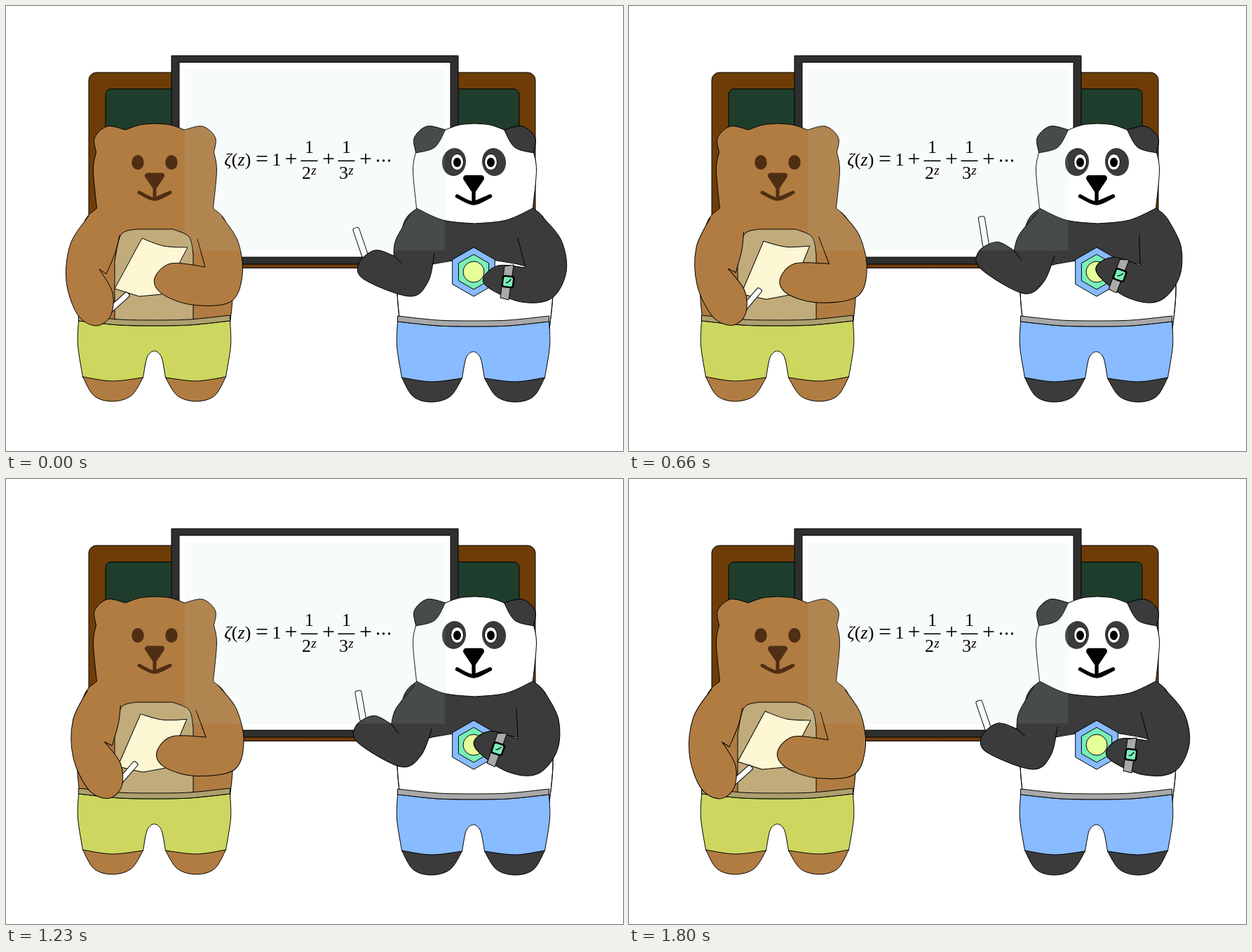
An HTML page with a canvas for the animation above (1830 ms loop, 880 by 636 pixels).

```html
<!DOCTYPE html>
<html lang="en">
<head>
<meta charset="utf-8">
<title>Zeta lecture</title>
<style>
html, body { margin: 0; width: 100%; height: 100%; overflow: hidden; background: #fff; }
canvas { display: block; width: 880px; height: 636px; }
</style>
</head>
<body>
<canvas id="stage"></canvas>
<script>
const W = 880, H = 636, LOOP = 1830, STEP = 30;
const FUR = '#b17c42', FACE = '#4f2e13', DARK = '#3b3b3b', BLUE = '#88bbff', TEAL = '#79efb9', GREY = '#a9a9a9';
const canvas = document.getElementById('stage');
const ctx = canvas.getContext('2d');
const dpr = window.devicePixelRatio || 1;
canvas.width = W * dpr;
canvas.height = H * dpr;

// Key points as text; "|" marks a corner between smooth parts.
const parse = text => text.split('|').map(part =>
  part.trim().split(/\s+/).map(s => s.split(',').map(Number)));

function trace(parts, close) {
  const path = new Path2D();
  parts.forEach((q, k) => {
    if (k) path.lineTo(...q[0]); else path.moveTo(...q[0]);
    for (let i = 0; i < q.length - 1; i++) {
      const b = q[i], c = q[i + 1], a = q[i - 1] || b, d = q[i + 2] || c;
      path.bezierCurveTo(b[0] + (c[0] - a[0]) / 6, b[1] + (c[1] - a[1]) / 6,
        c[0] - (d[0] - b[0]) / 6, c[1] - (d[1] - b[1]) / 6, c[0], c[1]);
    }
  });
  if (close) path.closePath();
  return path;
}
const curve = text => trace(parse(text), false);
const shape = text => trace(parse(text), true);
const flip = parts => parts.map(q => q.map(([x, y]) => [-x, y]));
// Closes a left half with its mirror image about x = 0.
function whole(text) {
  const half = parse(text);
  const back = flip(half).reverse().map(q => q.reverse());
  return trace([...half, ...back], true);
}
const pair = text => [trace(parse(text), true), trace(flip(parse(text)), true)];

function hexagon(x, y, r) {
  const p = new Path2D();
  for (let i = 0; i < 6; i++) p.lineTo(x + r * Math.sin(i * Math.PI / 3), y - r * Math.cos(i * Math.PI / 3));
  p.closePath();
  return p;
}

function paint(path, fill, line = '#000', width = 1) {
  if (fill) { ctx.fillStyle = fill; ctx.fill(path); }
  if (line) { ctx.strokeStyle = line; ctx.lineWidth = width; ctx.stroke(path); }
}
function box(x, y, w, h, r, fill, line) {
  const p = new Path2D();
  p.roundRect(x, y, w, h, r);
  paint(p, fill, line);
}
function oval(x, y, rx, ry, fill, line = null, turn = 0) {
  const p = new Path2D();
  p.ellipse(x, y, rx, ry, turn, 0, Math.PI * 2);
  paint(p, fill, line);
}
function at(x, y, deg, draw) {
  ctx.save();
  ctx.translate(x, y);
  ctx.rotate(deg * Math.PI / 180);
  draw();
  ctx.restore();
}
const swing = (x, y, deg, draw) => at(x, y, deg, () => { ctx.translate(-x, -y); draw(); });
const stick = (x, y, deg, w, len) => at(x, y, deg, () => box(-w / 2, 0, w, len, 2.5, '#fff'));

// Parts shared by both animals, around their own axis.
const EAR = '-42,177 -68,172 -86,188 -84,209';
const HEAD = `0,168 -22,170 -42,177 | ${EAR} | -84,209 -88,235 -83,289`;
const BODY = '-83,289 -103,315 -111,400 -106,462';
const part = {
  figure: whole(`${HEAD} | ${BODY}`),
  head: whole(`${HEAD} | -83,289 -45,306 0,311`),
  body: whole(BODY),
  ears: pair(`${EAR} | -84,210 -57,202 -42,177`),
  belt: whole('0,449 -50,448 -108,442 | -108,450 -50,456 0,457'),
  shorts: whole('0,457 -50,456 -108,450 | -108,450 -109,485 -102,530 | -102,530 -60,536 -16,531 | -16,531 -11,504 -5,495 0,493'),
  feet: pair('-102,530 -86,557 -60,565 -33,557 -16,531'),
  nose: shape('-10,2 | 10,2 | 0,17'),
  smile: curve('-22,26 0,35.5 22,26 | 0,35.5 | 0,16')
};
const bear = {
  belly: shape('155,460 | 155,365 164,327 185,319 | 238,319 261,330 267,355 | 267,460'),
  paper: shape('194,332 225,343 259,345 | 238,385 222,412 | 190,415 155,404'),
  right: curve('308,301 331,337 337,385 320,423 265,427 222,411 212,389 235,368 284,373 | 284,373 273,333'),
  left: curve('118,300 92,340 86,393 102,441 128,457 149,443 152,410 133,376 | 143,383 156,352 162,327')
};
const panda = {
  left: curve('577,297 556,334 553,357 | 553,357 526,349 503,368 511,391 576,415 602,394 611,354'),
  right: curve('764,300 792,335 799,380 778,418 735,423 690,404 681,388 702,371 741,374 | 741,374 730,332'),
  crease: curve('553,357 565,368'),
  strap: shape('711,372 | 724,370 | 717,420 | 705,417')
};

function board() {
  box(118, 95, 637, 279.5, 11, '#6e3d07');
  box(142, 118.5, 590, 232, 8, '#1f3d2c');
  box(236, 71, 409, 298, 0, '#2f2f2f');
  box(247, 80.5, 387, 278.5, 0, '#fff');
}

function lower(x, y, shorts, belt, feet) {
  at(x, y, 0, () => {
    part.feet.forEach(f => paint(f, feet));
    paint(part.shorts, shorts);
    paint(part.belt, belt);
  });
}

function muzzle(x, y, size, color) {
  at(x, y, 0, () => {
    ctx.scale(size, size);
    ctx.lineCap = 'round';
    paint(part.nose, color, color, 8);
    paint(part.smile, null, color, 5);
  });
}

function drawBear(p) {
  at(212.5, 0, 0, () => paint(part.figure, FUR));
  paint(bear.belly, '#c1ab7b');
  lower(211.5, 0, '#cdd75f', '#ada06e', FUR);
  [-24, 24].forEach(dx => oval(212 + dx, 223.5, 8.7, 10.5, FACE));
  muzzle(212, 240.5, 1, FACE);
  swing(238, 357, -6.7 * p, () => {
    paint(bear.paper, '#fef7d3');
    paint(bear.right, FUR);
  });
  swing(133, 314, -9.5 * p, () => {
    stick(174.5, 411, 48, 8, 36);
    paint(bear.left, FUR);
  });
}

function shirt() {
  const chest = new Path2D('M-120,280 V389 Q0,335 120,389 V280 Z');
  at(669, 0, 0, () => {
    paint(part.body, '#fff');
    ctx.save();
    ctx.clip(part.body);
    paint(chest, DARK);
    ctx.restore();
    paint(part.body);
  });
}

function drawPanda(p) {
  shirt();
  lower(666.5, 1, BLUE, GREY, DARK);
  at(668.5, 0, 0, () => {
    paint(part.head, '#fff');
    part.ears.forEach(e => paint(e, DARK));
  });
  [-1, 1].forEach(s => {
    oval(667.5 + s * 28.5, 223, 17, 20, DARK, null, s * -0.15);
    oval(667.5 + s * 24, 223, 9, 11.5, '#fff', '#000');
    oval(667.5 + s * 24, 223.5, 5.5, 6.7, '#000');
  });
  muzzle(667, 244, 1.07, '#000');
  paint(hexagon(667, 380, 35), BLUE);
  paint(hexagon(667, 380, 25), TEAL);
  oval(667, 380, 15, 15, '#e6ff99', '#000');
  swing(594, 332, 12 * p, () => {
    stick(498.5, 317, -18.9, 9, 44);
    paint(panda.left, DARK);
    paint(panda.crease);
  });
  swing(749, 320, 16 * p, () => {
    paint(panda.right, DARK);
    paint(panda.strap, GREY);
    at(716, 394, 7, () => {
      box(-9, -9, 18, 18, 4, '#000', null);
      box(-6.5, -6.5, 13, 13, 2, TEAL, null);
      paint(curve('-3,2 | 0,1 | 4,-4'), null, '#000', 1.3);
    });
  });
}

function type(text, x, y, size = 26, style = '') {
  ctx.font = `${style} ${size}px "Liberation Serif", "Times New Roman", serif`;
  ctx.fillText(text, x, y);
}

function fraction(x, n) {
  type('1', x, 210);
  ctx.fillRect(x - 12, 220.5, 24, 1.6);
  type(n, x - 4, 247);
  type('z', x + 6.5, 241, 19, 'italic');
}

function formula() {
  ctx.fillStyle = '#000';
  ctx.textAlign = 'center';
  type('ζ', 316.5, 228, 26, 'italic');
  type('(', 326, 228);
  type('z', 335.5, 228, 26, 'italic');
  type(')', 345, 228);
  type('=', 365, 229, 32);
  type('1', 386, 228);
  [406.5, 460, 513].forEach(x => type('+', x, 229, 32));
  fraction(432.5, '2');
  fraction(485.5, '3');
  for (let i = 0; i < 3; i++) oval(530.5 + i * 8, 221, 1.7, 1.7, '#000');
}

function frame(now) {
  const t = Math.floor(now % LOOP / STEP) * STEP;
  const p = (1 - Math.cos(2 * Math.PI * t / LOOP)) / 2;
  ctx.setTransform(dpr, 0, 0, dpr, 0, 0);
  ctx.lineJoin = 'round';
  ctx.fillStyle = '#fff';
  ctx.fillRect(0, 0, W, H);
  board();
  drawBear(p);
  drawPanda(p);
  ctx.fillStyle = 'rgba(175, 215, 205, 0.1)';
  ctx.fillRect(255, 90, 371, 259.5);
  formula();
}

let start = null;
function tick(now) {
  if (start === null) start = now;
  frame(Math.max(0, now - start));
  requestAnimationFrame(tick);
}
frame(0);
requestAnimationFrame(tick);
</script>
</body>
</html>
```
